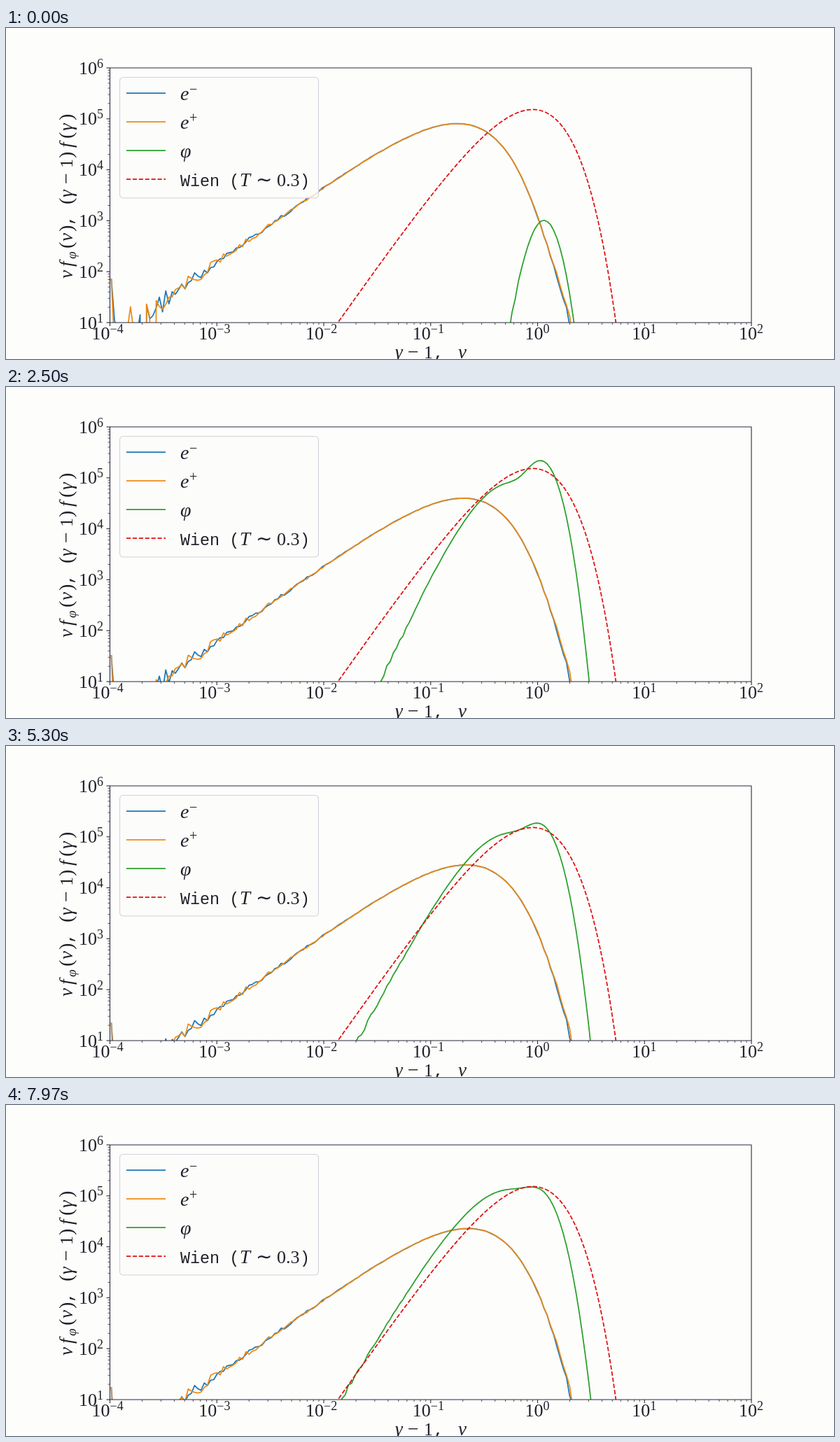
These frames come from a looping animation (1183x473 px, 8000 ms). An HTML page with a canvas:

```html
<!DOCTYPE html>
<html lang="en">
<head>
<meta charset="utf-8">
<title>Particle spectra</title>
<style>
html, body { margin: 0; width: 100%; height: 100%; overflow: hidden; background: #fdfdfc; }
canvas { display: block; }
</style>
</head>
<body>
<canvas id="plot" width="1183" height="473"></canvas>
<script>
const ctx = document.getElementById('plot').getContext('2d');
const LEFT = 148.5, RIGHT = 1065, TOP = 57, BOTTOM = 421;
const DX = (RIGHT - LEFT) / 6, DY = (BOTTOM - TOP) / 5;
const LOOP = 8000, STEP = 1000 / 30, BINS = 200;
const BLUE = '#1f77b4', ORANGE = '#ee8a14', GREEN = '#2ca02c', RED = '#e01010', INK = '#20202a';
const SERIF = '"Liberation Serif", serif', MONO = '"Liberation Mono", monospace';
const DASH = [6.2, 2.7];

const mix = (a, b, p) => a + (b - a) * p;
const rand = n => { const v = Math.sin(n * 12.9898) * 43758.5453; return 2 * (v - Math.floor(v)) - 1; };
const binX = i => 150.4 + 4.58 * i;
const energy = x => 10 ** ((x - LEFT) / DX - 4);
const height = f => TOP + DY * (6 - Math.log10(f));
const density = y => 10 ** (6 - (y - TOP) / DY);

// Counting noise in pixels: large where few particles fall in a bin
const noise = (f, k, n, size) => size * rand(n) / Math.sqrt(f) / (1 + k);

// Relativistic thermal distribution with a weak hot tail; s runs from 0 to 1
function leptonDensity(k, s) {
  const weight = k ** 1.5 * (1 + k) * Math.sqrt(1 + k / 2);
  const main = 10 ** mix(6.68, 5.96, s) * Math.exp(-k / mix(0.1037, 0.1252, s));
  const hot = 10 ** mix(4.59, 4.69, s) * Math.exp(-k / 0.186);
  return weight * (main + hot);
}

function leptons(seed, s) {
  const points = [];
  for (let i = 0; i < 148; i++) {
    const x = binX(i), k = energy(x), first = leptonDensity(k, 0);
    let y = height(leptonDensity(k, s)) + noise(first, k, i + seed, 80);
    if (i === 0) y = 358 + 45 * s; // the first bin also holds all lower energies
    else if (first < 20 && k < 1 && rand(3 * i + seed) > 0.3) y = 9999; // empty bin
    points.push([x, y]);
  }
  return points;
}

// Hump with its top at ratio r = 1
const hump = (r, q) => (r * Math.exp(1 - r)) ** q;

// Annihilation peak plus a shoulder of cooled photons
function photons(t, s) {
  const peak = density(275 - DY * Math.log10(1 + t / 0.0055) + 85 * s * s);
  const shoulder = density(115 + 60 / (t + 0.03));
  const points = [];
  for (let i = 55; i < 156; i++) {
    const x = binX(i), nu = energy(x);
    const f = peak * hump(Math.sqrt(nu / mix(1.15, 1.04, s)), mix(80, 50, s))
      + shoulder * hump(nu / mix(0.57, 0.51, s), mix(6.5, 3.67, s));
    if (f > 0.5) points.push([x, height(f) + noise(f, nu, i + 700, 22)]);
  }
  return points;
}

const wien = [];
for (let x = 465; x < 880; x += 3) {
  const nu = energy(x);
  wien.push([x, height(4.2e6 * nu ** 3 * Math.exp(-nu / 0.3))]);
}

function curve(points, color, dash = []) {
  ctx.beginPath();
  for (const [x, y] of points) ctx.lineTo(x, y);
  ctx.setLineDash(dash);
  ctx.strokeStyle = color;
  ctx.lineWidth = 1.75;
  ctx.lineJoin = 'round';
  ctx.stroke();
  ctx.setLineDash([]);
}

function text(str, x, y, size = 26, style = '', family = SERIF) {
  ctx.font = `${style} ${size}px ${family}`;
  ctx.fillStyle = INK;
  ctx.fillText(str, x, y);
}
const italic = (str, x, y, size = 27) => text(str, x, y, size, 'italic');
const mono = (str, x, y) => text(str, x, y, 23.4, '', MONO);

function tick(x, y, dx, dy, width) {
  ctx.lineWidth = width;
  ctx.beginPath();
  ctx.moveTo(x, y);
  ctx.lineTo(x + dx, y + dy);
  ctx.stroke();
}

function axes() {
  ctx.strokeStyle = '#2a2a3c';
  for (let d = 0; d <= 6; d++) {
    const x = LEFT + d * DX, e = d - 4, shift = e < 0 ? 26 : 18;
    tick(x, BOTTOM, 0, 5, 1.1);
    text('10', x - shift, 445);
    text(e < 0 ? '−' + -e : e, x - shift + 26, 436, 18);
    for (let m = 2; d < 6 && m < 10; m++) tick(x + DX * Math.log10(m), BOTTOM, 0, 3, 0.8);
  }
  for (let d = 0; d <= 5; d++) {
    const y = BOTTOM - d * DY;
    tick(LEFT, y, -5, 0, 1.1);
    text('10', 104, y + 8.5);
    text(d + 1, 130, y - 0.5, 18);
    for (let m = 2; d < 5 && m < 10; m++) tick(LEFT, y - DY * Math.log10(m), -3, 0, 0.8);
  }
  ctx.lineWidth = 1.1;
  ctx.strokeRect(LEFT, TOP, RIGHT - LEFT, BOTTOM - TOP);

  italic('γ', 556, 472);
  text('−', 574, 472, 28);
  text('1', 597, 472);
  mono(',', 611, 472);
  italic('ν', 646, 472);

  ctx.save();
  ctx.translate(95, 358);
  ctx.rotate(-Math.PI / 2);
  italic('ν', 0, 0);
  italic('f', 17, 0);
  italic('φ', 28, 5, 19);
  text('(', 43, 0, 28);
  italic('ν', 53, 0);
  text(')', 67, 0, 28);
  mono(',', 76, 0);
  text('(', 106, 0, 28);
  italic('γ', 116, 0);
  text('−', 135, 0, 28);
  text('1', 158, 0);
  text(')', 172, 0, 28);
  italic('f', 187, 0);
  text('(', 200, 0, 28);
  italic('γ', 211, 0);
  text(')', 226, 0, 28);
  ctx.restore();
}

function legend() {
  ctx.beginPath();
  ctx.roundRect(162.5, 70.5, 284, 172.5, 5);
  ctx.fillStyle = 'rgba(253,253,252,0.8)';
  ctx.fill();
  ctx.strokeStyle = '#d2d2dc';
  ctx.lineWidth = 1.1;
  ctx.stroke();
  [BLUE, ORANGE, GREEN, RED].forEach((color, k) => {
    const y = 93 + 41 * k;
    curve([[172, y], [228, y]], color, color === RED ? DASH : []);
  });
  italic('e', 249, 103, 28);
  text('−', 262, 94, 20);
  italic('e', 249, 144, 28);
  text('+', 262, 135, 20);
  italic('φ', 249, 185, 28);
  mono('Wien (', 249, 226);
  italic('T', 334, 226);
  text('∼', 357, 226, 28);
  text('0.3', 387, 226);
  mono(')', 420, 226);
}

function draw(now) {
  const t = Math.floor((now % LOOP + 5) / STEP) * STEP % LOOP / 1000;
  const s = Math.log10(1 + t / 1.2) / 0.883;
  ctx.fillStyle = '#fdfdfc';
  ctx.fillRect(0, 0, 1183, 473);
  ctx.save();
  ctx.beginPath();
  ctx.rect(LEFT, TOP, RIGHT - LEFT, BOTTOM - TOP);
  ctx.clip();
  curve(leptons(BINS, s), BLUE);
  curve(leptons(2 * BINS, s), ORANGE);
  curve(photons(t, s), GREEN);
  curve(wien, RED, DASH);
  ctx.restore();
  axes();
  legend();
}

let start;
function loop(now) {
  start ??= now;
  draw(now - start);
  requestAnimationFrame(loop);
}
draw(0);
requestAnimationFrame(loop);
</script>
</body>
</html>
```
